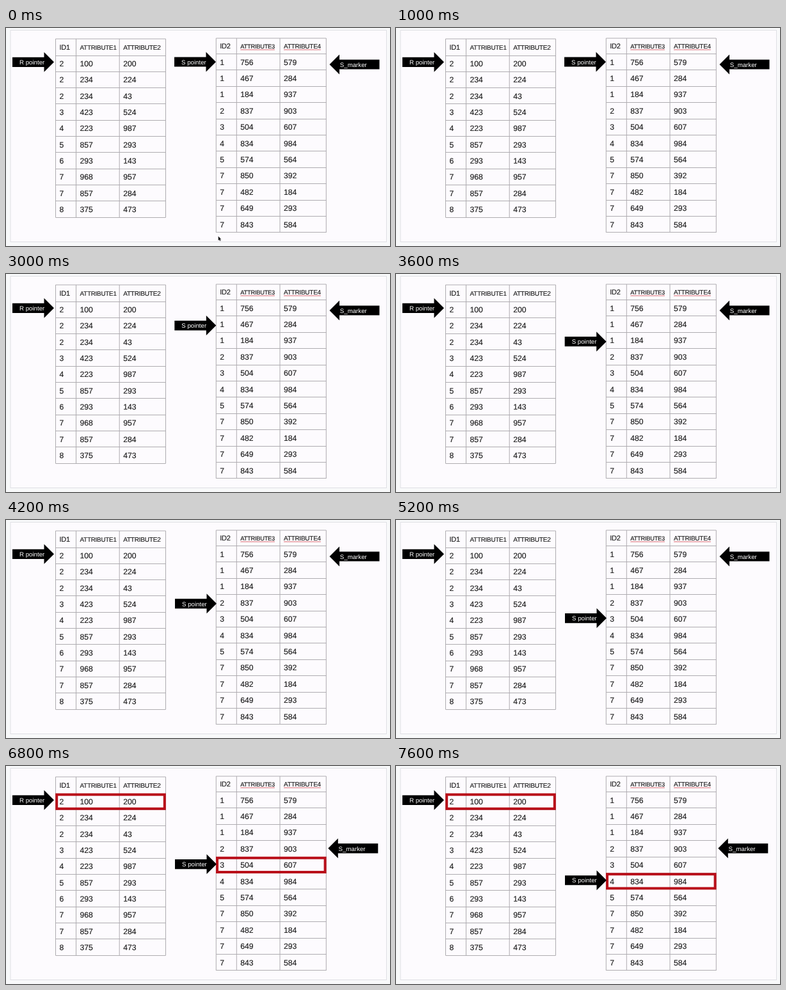
These frames come from a looping animation (600 by 341 pixels, 8000 ms). An HTML page:

```html
<!DOCTYPE html>
<html lang="en">
<head>
<meta charset="utf-8">
<title>Merge join</title>
<style>
  html, body { margin: 0; width: 100%; height: 100%; overflow: hidden; background: #f8f9fa; }
  svg { display: block; width: 100vw; height: 100vh; }
  text {
    font: 12.2px "Liberation Sans", Arial, sans-serif;
    text-rendering: geometricPrecision;
    fill: #1c1c1c; stroke: #1c1c1c; stroke-width: 0.15;
  }
  .head { letter-spacing: -0.25px; }
  .label { fill: #fff; stroke: none; font-size: 9.7px; }
  .grid { stroke: #aeacb0; fill: none; }
  .mark { stroke: #b90f1a; stroke-width: 4; fill: none; }
  .spell { stroke: #dc6a72; stroke-width: 1.1; }
</style>
</head>
<body>
<svg id="stage" viewBox="0 0 600 341"></svg>
<script>
const LOOP = 8000;
const stage = document.getElementById('stage');

function add(parent, tag, attrs, text) {
  const node = document.createElementNS('http://www.w3.org/2000/svg', tag);
  for (const key in attrs) node.setAttribute(key, attrs[key]);
  if (text !== undefined) node.textContent = text;
  parent.appendChild(node);
  return node;
}

function table({ left, top, first, pitch, id, fields, sizes, body, spell }) {
  const rows = body.split(', ').map(row => row.split(' '));
  const cols = [left, left + 32, left + 99.7, left + 172];
  const rowY = r => first + r * pitch;

  let d = `M${cols[0]} ${top}H${cols[3]}`;
  for (let r = 0; r <= rows.length; r++) {
    d += `M${cols[0]} ${Math.floor(rowY(r)) + 0.5}H${cols[3]}`;
  }
  for (const x of cols) d += `M${x} ${top}V${rowY(rows.length)}`;
  add(stage, 'path', { d, class: 'grid' });

  [id, ...fields].forEach((name, c) => {
    const x = cols[c] + 6, y = (top + first) / 2 + 4;
    const style = `font-size: ${sizes[c]}px`;
    const head = add(stage, 'text', { x, y, class: 'head', style }, name);
    if (spell && c) {
      add(stage, 'path', { d: `M${x} 34h${head.getComputedTextLength()}`, class: 'spell' });
    }
  });
  rows.forEach((row, r) => row.forEach((value, c) => {
    add(stage, 'text', { x: cols[c] + 6, y: rowY(r) + 17.1 }, value);
  }));

  const mark = add(stage, 'rect', {
    x: left + 1.7, width: 168.6, height: pitch - 3.2, class: 'mark'
  });
  return {
    highlight(r, on) {
      mark.setAttribute('y', rowY(r) + 1.7);
      show(mark, on);
    }
  };
}

// Arrow whose tip is at the group's origin; dir 1 points right, -1 left.
function arrow(dir, length, label, labelX) {
  const g = add(stage, 'g', {});
  const neck = -15.5 * dir, tail = -length * dir;
  add(g, 'path', { d: `M0 0L${neck} -15.5V-7.6H${tail}V7.6H${neck}V15.5Z` });
  add(g, 'text', { x: labelX, y: 3.7, class: 'label' }, label);
  return g;
}

function place(node, x, y) {
  node.setAttribute('transform', `translate(${x} ${y})`);
}

function show(node, on) {
  node.setAttribute('visibility', on ? 'visible' : 'hidden');
}

add(stage, 'rect', { x: 7, y: 3.5, width: 587.5, height: 331, fill: '#fdfbfe', stroke: '#dfe0e4' });

const tableR = table({
  left: 77.5, top: 17, first: 43, pitch: 25.33,
  id: 'ID1', fields: ['ATTRIBUTE1', 'ATTRIBUTE2'], sizes: [11, 9.9, 10.1],
  body: '2 100 200, 2 234 224, 2 234 43, 3 423 524, 4 223 987, ' +
    '5 857 293, 6 293 143, 7 968 957, 7 857 284, 8 375 473'
});
const tableS = table({
  left: 328.3, top: 16, first: 40.5, pitch: 25.4, spell: true,
  id: 'ID2', fields: ['ATTRIBUTE3', 'ATTRIBUTE4'], sizes: [11, 9.3, 10],
  body: '1 756 579, 1 467 284, 1 184 937, 2 837 903, 3 504 607, 4 834 984, ' +
    '5 574 564, 7 850 392, 7 482 184, 7 649 293, 7 843 584'
});

const pointerR = arrow(1, 65, 'R pointer', -54);
const pointerS = arrow(1, 65, 'S pointer', -54);
const marker = arrow(-1, 78, 'S_marker', 16.3);
const mouse = add(stage, 'path', {
  d: 'M331.7 325.8v6.6l1.5-1.4 1.1 2.3 1.1-.5-1.1-2.2h2z', fill: '#111'
});
place(pointerR, 75, 53.3);

// One row per second from 2.2 s, a pause at the fifth row, then one more.
function rowAt(t) {
  if (t >= 7600) return 5;
  return Math.max(0, Math.min(4, Math.floor((t - 1200) / 1000)));
}

function draw(now) {
  const t = now % LOOP;
  const row = rowAt(t);
  const sag = row > 0 && row < 4 ? 2.4 : 0; // hand-placed a little low on these rows
  place(pointerS, 328 + Math.min(1, row / 3), 53 + 25.15 * row + sag);
  if (t < 6000) place(marker, 505.5, 57);
  else place(marker, 503.3, 128.8);

  show(mouse, t < 200);
  tableR.highlight(0, t >= 6800);
  tableS.highlight(row, t >= 6800);
}

const start = performance.now();
function tick() {
  draw(performance.now() - start);
  requestAnimationFrame(tick);
}
tick();
</script>
</body>
</html>
```
